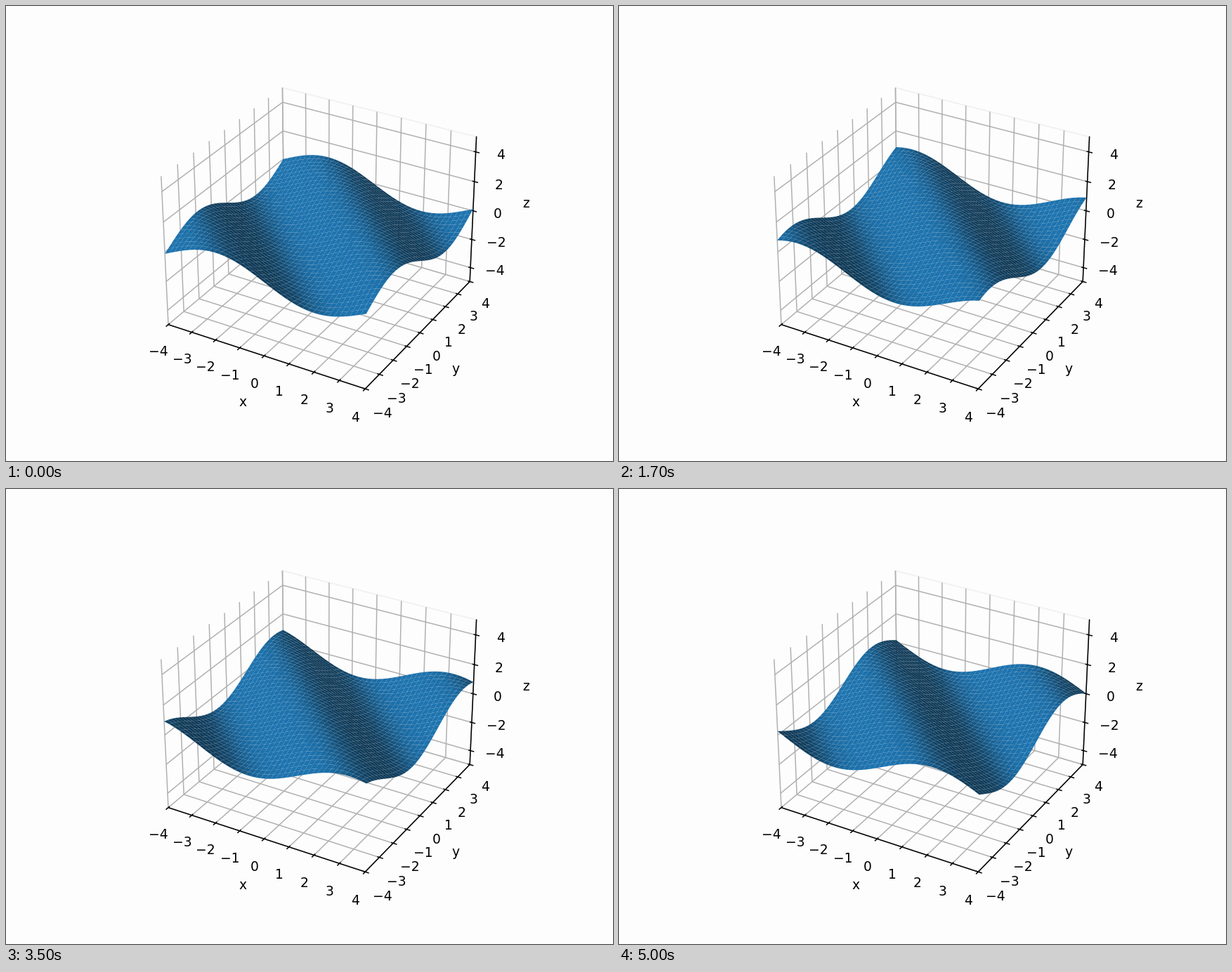
A matplotlib script for the animation above (5100 ms loop, 864 by 648 pixels).

```python
import matplotlib.pyplot as plt
import numpy as np
from matplotlib.animation import FuncAnimation

DPI = 135
FRAMES = 51
INTERVAL = 100      # ms
WAVE_NUMBER = 0.8
PHASE_STEP = 0.06   # radians per frame
BACKGROUND = "#fdfdfd"

fig = plt.figure(figsize=(864 / DPI, 648 / DPI), dpi=DPI, facecolor=BACKGROUND)
ax = fig.add_subplot(projection="3d", facecolor=BACKGROUND)
ax.set(xlim=(-4, 4), ylim=(-4, 4), zlim=(-5, 5),
       xlabel="x", ylabel="y", zlabel="z")
for axis in (ax.xaxis, ax.yaxis, ax.zaxis):
    axis.pane.fill = False
ax.xaxis.pane.set_edgecolor(BACKGROUND)

side = np.linspace(-4, 4, 40)
x, y = np.meshgrid(side, side)
surface = None


def draw(i):
    """Redraw the diagonal wave at step i."""
    global surface
    if surface is not None:
        surface.remove()
    z = np.sin(WAVE_NUMBER * (x + y) + PHASE_STEP * i)
    surface = ax.plot_surface(x, y, z, color="C0")
    return [surface]


anim = FuncAnimation(fig, draw, frames=FRAMES, interval=INTERVAL,
                     repeat=True, repeat_delay=0)
plt.show()
```
